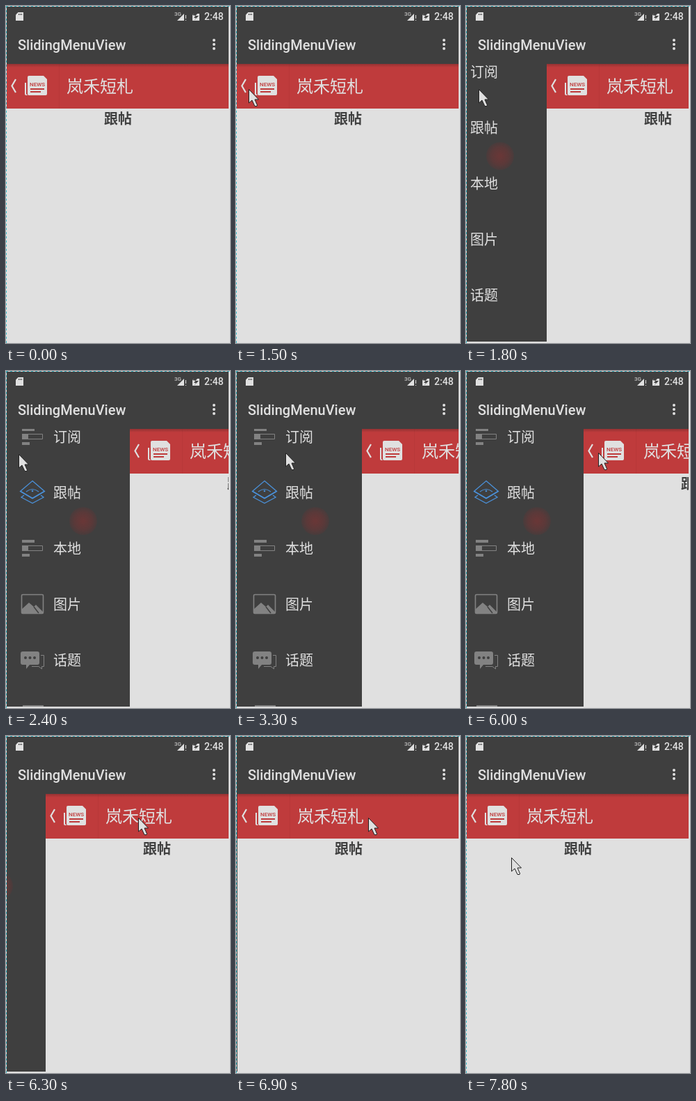
Recreate the animation shown at these times as an HTML page with a canvas. Size 322x483 px, loop 8000 ms.

```html
<!DOCTYPE html>
<html lang="zh">
<head>
<meta charset="utf-8">
<style>
  html, body { margin: 0; width: 100%; height: 100%; overflow: hidden; background: #e0e0e0; }
  canvas { display: block; }
</style>
</head>
<body>
<canvas id="stage" width="322" height="483"></canvas>
<script>
const ctx = document.getElementById('stage').getContext('2d');
const LOOP = 8000, STEP = 300, MENU_WIDTH = 180;
const DARK = '#3f3f3f', LIGHT = '#e0e0e0', RED = '#bf3b3c', GREY = '#828282', BLUE = '#4a8fd6';
const CJK = '"Noto Sans CJK SC", "Noto Sans CJK", sans-serif';
const LATIN = 'Roboto, sans-serif';

// Each pose is held from its step until the next listed one.
const slides = [[0, 0], [6, 115], [7, 165], [8, 177], [9, 180], [20, 168], [21, 56], [22, 9], [23, 1], [25, 0]];
const pointers = [
  [0, -40, 143], [2, -4, 143], [3, 14, 122], [4, 17, 119], [5, 18, 119], [10, 59, 117], [11, 71, 117],
  [12, 87, 117], [13, 154, 116], [14, 176, 116], [15, 177, 116], [16, 178, 115], [17, 187, 116],
  [18, 190, 117], [24, 189, 117], [25, 153, 143], [26, 65, 174]
];
const poseAt = (poses, step) => poses.filter(p => p[0] <= step).pop().slice(1);

function rect(x, y, w, h, color) {
  ctx.fillStyle = color;
  ctx.fillRect(x, y, w, h);
}

function disc(x, y, r, color) {
  ctx.fillStyle = color;
  ctx.beginPath();
  ctx.arc(x, y, r, 0, 7);
  ctx.fill();
}

function text(str, x, y, font, color = LIGHT) {
  ctx.font = font;
  ctx.fillStyle = color;
  ctx.fillText(str, x, y);
}

// Path data drawn with an optional fill and stroke.
function shape(d, fill, stroke, width = 1) {
  const path = new Path2D(d);
  if (fill) { ctx.fillStyle = fill; ctx.fill(path); }
  if (stroke) { ctx.strokeStyle = stroke; ctx.lineWidth = width; ctx.stroke(path); }
}

function clipped(x, y, w, h, draw) {
  ctx.save();
  ctx.beginPath();
  ctx.rect(x, y, w, h);
  ctx.clip();
  draw();
  ctx.restore();
}

function listIcon(y) {
  rect(26, y - 12, 18, 4, GREY);
  rect(26, y - 4, 9, 8, GREY);
  shape(`M26.5 ${y - 3.5}h29v7h-29z`, null, GREY);
  rect(26, y + 8, 11, 4, GREY);
}

function layersIcon() {
  shape('M41 157.5L58.5 172.5L41 182.5L23.5 172.5Z', null, BLUE, 1.3);
  shape('M32 173Q41 166 50 173', null, BLUE, 1.2);
  shape('M24 172.5L41 182.5L58 172.5', null, BLUE, 1.6);
  shape('M29 178L25 181L41 189.5L57 181L53 178', null, BLUE, 1.4);
  disc(41, 172, 1.3, BLUE);
}

function pictureIcon() {
  shape('M27 320.5H55Q56.5 320.5 56.5 322V346Q56.5 347.5 55 347.5H27Q25.5 347.5 25.5 346V322Q25.5 320.5 27 320.5Z', null, GREY, 1.6);
  shape('M26 341L36 332L43 338L46 335L56 345V347H26Z', GREY);
  shape('M43 338L50 347', null, DARK, 1.5);
}

function chatIcon() {
  shape('M27 402H48Q51 402 51 405V418Q51 421 48 421H37L32 427V421H27Q24 421 24 418V405Q24 402 27 402Z', GREY);
  for (const x of [31, 37.5, 44]) disc(x, 411, 2, DARK);
  shape('M53 407.5H57.5V423.5H54.5V427L50 423.5H40', null, GREY);
}

function drawMenu() {
  rect(-1, 83, MENU_WIDTH + 2, 398, DARK);
  const touch = ctx.createRadialGradient(114, 215, 2, 114, 215, 20);
  touch.addColorStop(0, '#683737');
  touch.addColorStop(.6, '#5a3939');
  touch.addColorStop(1, '#483c3c');
  disc(114, 215, 20, touch);
  ['订阅', '跟帖', '本地', '图片', '话题'].forEach((label, i) => text(label, 71, 102 + 80 * i, '20px ' + CJK));
  listIcon(94);
  layersIcon();
  listIcon(254);
  pictureIcon();
  chatIcon();
  rect(27, 479, 30, 3, GREY);
}

function drawPage() {
  rect(1, 83, 320, 400, LIGHT);
  rect(1, 83, 320, 64, RED);
  rect(76, 83, 1, 64, '#b83839');
  const shadow = ctx.createLinearGradient(0, 83, 0, 88);
  shadow.addColorStop(0, 'rgba(50,30,30,.3)');
  shadow.addColorStop(1, 'rgba(50,30,30,0)');
  rect(1, 83, 320, 5, shadow);
  shape('M14 105L8.5 114.5L14 124', null, LIGHT, 2.2);
  shape('M33 100H54L59 105V126Q59 128 57 128H33Q31 128 31 126V102Q31 100 33 100Z', LIGHT);
  shape('M27 110H29V126L31 128H29Q27 128 27 126Z', LIGHT);
  text('NEWS', 34, 115, '500 8px ' + LATIN, RED);
  rect(35, 118, 20, 2, RED);
  rect(35, 122, 15, 2, RED);
  text('岚禾短札', 87, 124, '24px ' + CJK);
  text('跟帖', 141, 169, 'bold 20px ' + CJK, DARK);
}

function drawBars() {
  rect(1, 1, 319, 82, DARK);
  shape('M17.5 9H25V21H14V12.5Z', LIGHT);
  for (const x of [18, 20, 22]) rect(x, 11, 1, 2, DARK);
  text('3G', 242, 14, '8px ' + LATIN);
  shape('M256 11V21H246Z', LIGHT);
  rect(258, 13, 1, 5, LIGHT);
  rect(258, 20, 1, 1, LIGHT);
  shape('M270 11H278V21H268V13Z', LIGHT);
  shape('M268 13L270 11H275L270 17H273L271 20L277 14H273Z', DARK);
  text('2:48', 285, 20, '500 14px ' + LATIN);
  text('SlidingMenuView', 17, 63, '500 20px ' + LATIN);
  for (const y of [49, 55, 61]) disc(299, y, 2, LIGHT);
}

function drawFrame() {
  ctx.setLineDash([3, 3]);
  shape('M0 .5H322M.5 0V483', null, '#3fbccb');
  ctx.setLineDash([]);
}

function drawPointer(x, y) {
  ctx.save();
  ctx.translate(x + .5, y + .5);
  shape('M0 0V19.5L4.5 15.5L8.5 24H11.5L12 22.5L8.5 14.5H14Z', LIGHT, '#222');
  ctx.restore();
}

function render(now) {
  const step = Math.floor(now % LOOP / STEP);
  const [slide] = poseAt(slides, step);
  rect(0, 0, 322, 483, LIGHT);
  clipped(1, 83, 319, 398, () => {
    ctx.translate(slide - MENU_WIDTH, 0);
    drawMenu();
    ctx.translate(MENU_WIDTH, 0);
    drawPage();
  });
  drawBars();
  drawFrame();
  drawPointer(...poseAt(pointers, step));
}

const start = performance.now();
function tick() {
  render(performance.now() - start);
  requestAnimationFrame(tick);
}
tick();
</script>
</body>
</html>
```
